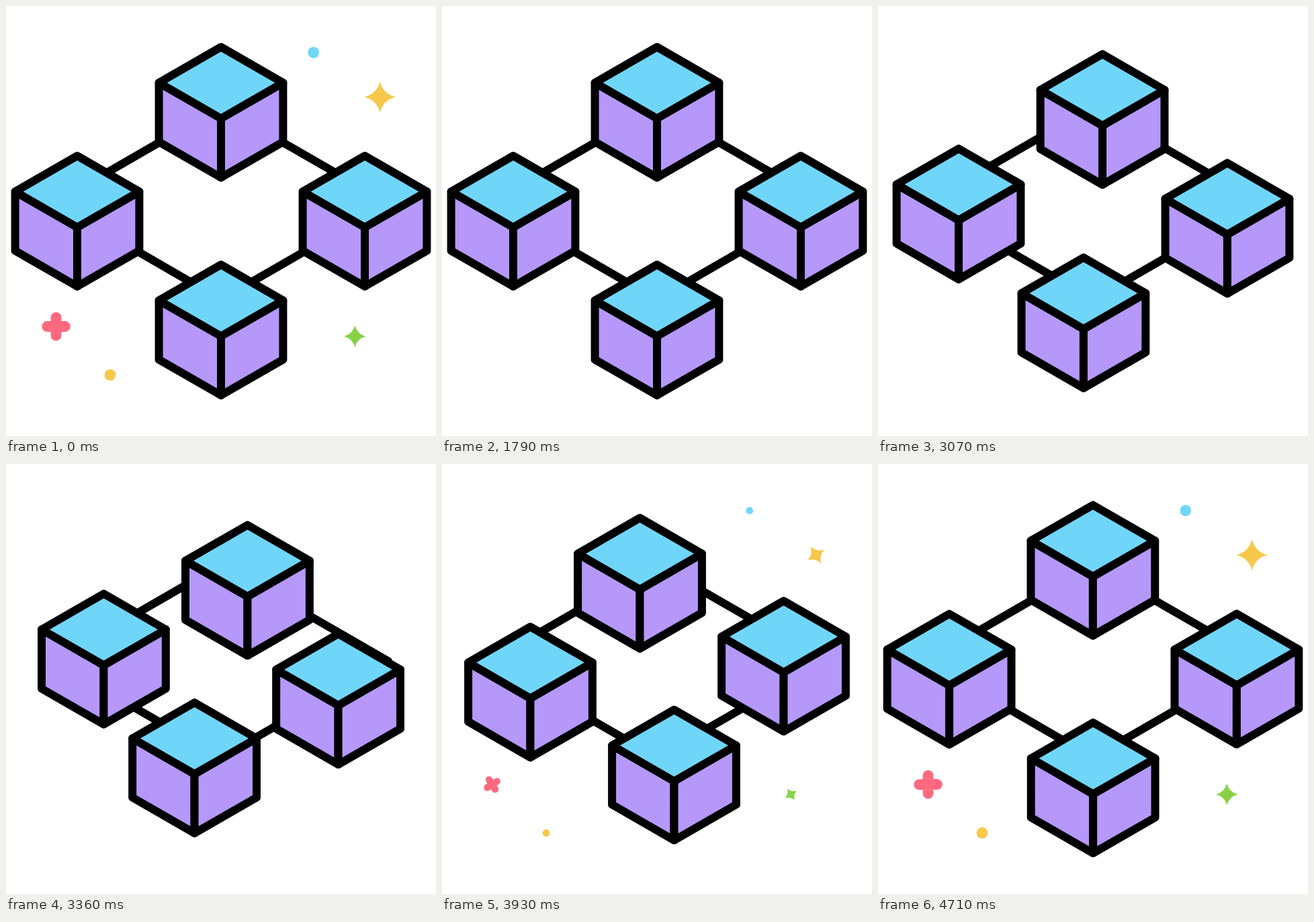
Animation, 640 px wide and 640 px high, one loop 4.78 s. Source, as an HTML page with a canvas:

```html
<!DOCTYPE html>
<html lang="en">
<head>
<meta charset="utf-8">
<title>Block chain</title>
<style>
  html, body { margin: 0; width: 100%; height: 100%; overflow: hidden; background: #fff; }
  canvas { display: block; width: 640px; height: 640px; }
</style>
</head>
<body>
<canvas id="stage" width="640" height="640"></canvas>
<script>
const ctx = document.getElementById('stage').getContext('2d');
const LOOP = 4780;
const CYAN = '#70d6f9', PURPLE = '#b598fa', YELLOW = '#f6c84c', PINK = '#ff697f', GREEN = '#88d147';
const LINE = 12;

// Cubic timing curve with end handles (a, 0) and (b, 1)
function ease(a, b) {
  return x => {
    if (x <= 0) return 0;
    if (x >= 1) return 1;
    let lo = 0, hi = 1;
    for (let i = 0; i < 40; i++) {
      const s = (lo + hi) / 2, r = 1 - s;
      if (3 * r * r * s * a + 3 * r * s * s * b + s * s * s < x) lo = s; else hi = s;
    }
    return lo * lo * (3 - 2 * lo);
  };
}
const slide = ease(0.8, 0.2);
const shrink = ease(1, 0.6);
const grow = ease(0.2, 0.07);

// Apexes of the four resting places, clockwise from the top
const spots = [[320, 61], [534, 223], [320, 385], [106, 223]];
const drawOrder = [3, 0, 1, 2];

function poly(points, fill) {
  ctx.beginPath();
  points.forEach(([x, y]) => ctx.lineTo(x, y));
  if (fill) {
    ctx.closePath();
    ctx.fillStyle = fill;
    ctx.fill();
  }
  ctx.stroke();
}

function cube(x, y) {
  const w = 92.4, h = 53.2, d = 88;
  const left = [x - w, y + h], right = [x + w, y + h], mid = [x, y + 2 * h];
  const foot = [x, y + 2 * h + d];
  poly([left, mid, foot, [x - w, y + h + d]], PURPLE);
  poly([right, mid, foot, [x + w, y + h + d]], PURPLE);
  poly([[x, y], right, mid, left], CYAN);
}

function links() {
  poly([[74.5, 291.8], [320, 150], [569, 293.4], [320, 437], [74.5, 295]]);
}

function dot() {
  ctx.beginPath();
  ctx.arc(0, 0, 8.4, 0, Math.PI * 2);
  ctx.fill();
}

function star(r) {
  const c = r * 0.2;
  ctx.beginPath();
  ctx.moveTo(0, -r);
  ctx.quadraticCurveTo(c, -c, r, 0);
  ctx.quadraticCurveTo(c, c, 0, r);
  ctx.quadraticCurveTo(-c, c, -r, 0);
  ctx.quadraticCurveTo(-c, -c, 0, -r);
  ctx.fill();
}

function plus() {
  const a = 13.4;
  ctx.lineWidth = 15.8;
  ctx.beginPath();
  ctx.moveTo(-a, 0);
  ctx.lineTo(a, 0);
  ctx.moveTo(0, -a);
  ctx.lineTo(0, a);
  ctx.stroke();
}

const sparks = [
  [457.7, 69.3, CYAN, dot],
  [155, 549.2, YELLOW, dot],
  [556.6, 135.4, YELLOW, () => star(23.2)],
  [519.3, 491.7, GREEN, () => star(16.2)],
  [74.6, 477, PINK, plus]
];

function drawSparks(size) {
  if (size <= 0) return;
  for (const [x, y, color, shape] of sparks) {
    ctx.save();
    ctx.translate(x, y);
    ctx.rotate((size - 1) * Math.PI / 2);
    ctx.scale(size, size);
    ctx.fillStyle = ctx.strokeStyle = color;
    shape();
    ctx.restore();
  }
}

// Pictures change 14 times a second; the motion is timed in ticks of 1/25 s
function tickAt(ms) {
  const step = Math.floor((ms % LOOP + 5) * 14 / 1000);
  return Math.floor(Math.min(step, 66) * 25 / 14);
}

function draw(tick) {
  ctx.fillStyle = '#fff';
  ctx.fillRect(0, 0, 640, 640);
  ctx.lineCap = ctx.lineJoin = 'round';
  ctx.lineWidth = LINE;
  ctx.strokeStyle = '#000';

  links();
  const p = slide((tick - 59) / 60);
  for (const i of drawOrder) {
    const [x0, y0] = spots[i], [x1, y1] = spots[(i + 1) % 4];
    cube(x0 + (x1 - x0) * p, y0 + (y1 - y0) * p);
  }
  drawSparks(tick < 60 ? 1 - shrink((tick - 14) / 30) : grow((tick - 89) / 30));
}

function frame() {
  draw(tickAt(performance.now()));
  requestAnimationFrame(frame);
}
frame();
</script>
</body>
</html>
```
